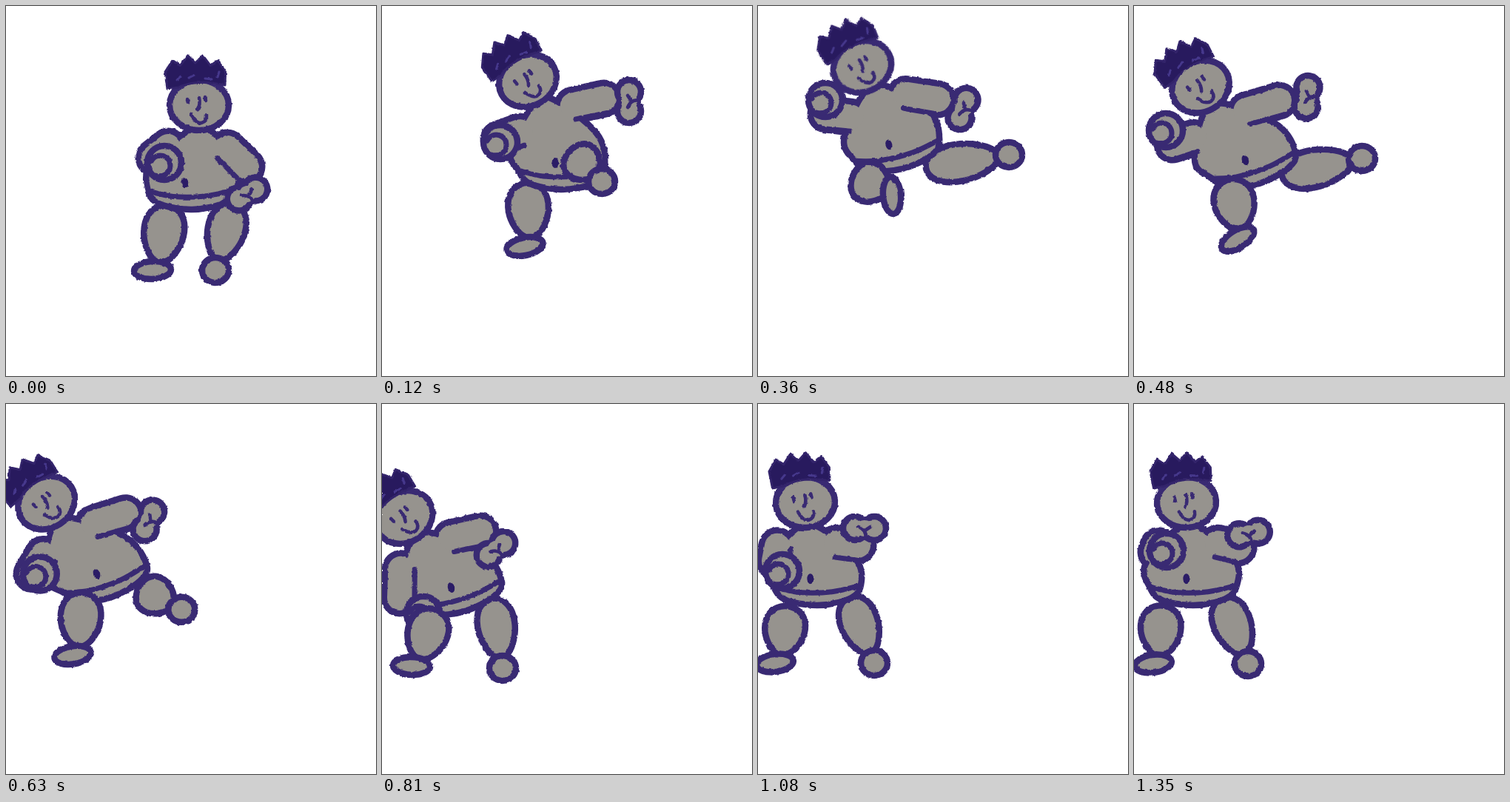
Recreate the animation shown at these times as an HTML page. Size 500 by 500 pixels, loop 8.11 s.

```html
<!DOCTYPE html>
<html lang="en">
<head>
<meta charset="utf-8">
<title>Leap</title>
<style>
  html, body { margin: 0; width: 100%; height: 100%; overflow: hidden; background: #fff; }
  svg { display: block; width: 100vw; height: 100vh; }
  #figure { fill: #96938e; stroke: #392a73; stroke-width: 8.5; stroke-linecap: round; stroke-linejoin: round; }
  .line { fill: none; stroke-width: 7; }
  .thin { fill: none; stroke-width: 4.6; }
  .fill { stroke: none; }
  .rim { stroke-width: 51; }
  .core { stroke: #96938e; stroke-width: 34; }
  .hair { fill: #281a5e; stroke: #33246b; stroke-width: 3; }
  .smudge { fill: none; stroke: #46388c; stroke-width: 3; }
  .ink { fill: #2b1c66; stroke: none; }
</style>
</head>
<body>
<svg viewBox="0 0 500 500">
  <defs>
    <filter id="rough" filterUnits="userSpaceOnUse" x="0" y="0" width="500" height="500" color-interpolation-filters="sRGB">
      <feTurbulence type="fractalNoise" baseFrequency="0.2" numOctaves="2" seed="4"/>
      <feDisplacementMap in="SourceGraphic" scale="3" xChannelSelector="R" yChannelSelector="G"/>
    </filter>
  </defs>
  <g filter="url(#rough)"><g id="figure"></g></g>
</svg>
<script>
const LOOP = 8110, STEP = 30, END = 1350;

// Joints of each key pose: x y, some with an angle. The outline is derived from them.
const stand = {
  root: '0 0', head: '261 134 0', hip: '251 249 -1',
  elbowL: '200 205', fist: '214 212', elbowR: '325 217', hand: '326 254 60',
  thighL: '213 308', footL: '198 357 -3', thighR: '297 305', footR: '283 357'
};
const kick = {
  root: '0 0', head: '197 101 -28', hip: '243 222 0',
  elbowL: '158 180', fist: '160 184', elbowR: '300 125', hand: '334 129 0',
  thighL: '198 276', footL: '193 325 -12', thighR: '271 212', footR: '297 237'
};
const fly = {
  root: '0 0', head: '141 82 -24', hip: '188 195 -14',
  elbowL: '92 146', fist: '91 127', elbowR: '243 126', hand: '277 139 20',
  thighL: '152 239', footL: '181 256 -95', thighR: '276 211', footR: '339 201'
};
const reach = {
  root: '0 0', head: '90 109 -29', hip: '162 215 -18',
  elbowL: '52 187', fist: '43 168', elbowR: '196 128', hand: '234 123 6',
  thighL: '136 268', footL: '140 315 -32', thighR: '247 219', footR: '308 206'
};
const land = {
  root: '0 0', head: '30 153 -33', hip: '105 255 -17',
  elbowL: '24 262', fist: '56 283', elbowR: '133 172', hand: '154 196 52',
  thighL: '61 311', footL: '40 354 2', thighR: '155 303', footR: '163 357'
};
const rise = {
  root: '0 0', head: '64 133 -4', hip: '80 246 -1',
  elbowL: '22 212', fist: '33 226', elbowR: '135 191', hand: '144 168 90',
  thighL: '36 306', footL: '23 350 -8', thighR: '138 299', footR: '157 350'
};
const guard = {
  ...rise, head: '71 133 -4',
  elbowL: '30 200', fist: '44 198', elbowR: '141 194', hand: '155 175 80',
  footL: '26 351 -8', thighR: '134 300', footR: '154 351'
};

const parse = pose => Object.fromEntries(
  Object.entries(pose).map(([k, v]) => [k, v.split(' ').map(Number)]));
const keys = [
  [0, stand], [120, kick], [270, { ...fly, root: '18 -13' }], [360, fly],
  [480, reach], [810, land], [1080, rise], [END, guard]
].map(([t, pose]) => ({ t, p: parse(pose) }));

// Hermite curve through the key poses, coming to rest at the last one.
function poseAt(t) {
  let i = 0;
  while (i < keys.length - 2 && t >= keys[i + 1].t) i++;
  const a = keys[i], b = keys[i + 1], dt = b.t - a.t, u = (t - a.t) / dt;
  const before = keys[i - 1] || a, after = keys[i + 2];
  const h = u * u * (3 - 2 * u), h0 = u * (1 - u) ** 2 * dt, h1 = u * u * (u - 1) * dt;
  const out = {};
  for (const k in a.p) {
    out[k] = a.p[k].map((v, n) => {
      const w = b.p[k][n];
      const m0 = (w - before.p[k][n]) / (b.t - before.t);
      const m1 = after ? (after.p[k][n] - v) / (after.t - a.t) : 0;
      return v + (w - v) * h + m0 * h0 + m1 * h1;
    });
  }
  return out;
}

// Smooth path through points.
function curve(pts, closed) {
  const n = pts.length;
  const at = i => pts[closed ? (i + n) % n : Math.min(n - 1, Math.max(0, i))];
  let d = 'M' + pts[0];
  for (let i = 0; i < (closed ? n : n - 1); i++) {
    const [p, q, r, s] = [at(i - 1), at(i), at(i + 1), at(i + 2)];
    const c1 = q.map((v, k) => v + (r[k] - p[k]) / 6);
    const c2 = r.map((v, k) => v - (s[k] - q[k]) / 6);
    d += `C${c1} ${c2} ${r}`;
  }
  return d + (closed ? 'Z' : '');
}

const path = (d, cls = '') => `<path class="${cls}" d="${d}"/>`;
const oval = (x, y, rx, ry, cls = '') => `<ellipse class="${cls}" cx="${x}" cy="${y}" rx="${rx}" ry="${ry}"/>`;
const place = ([x, y, angle = 0], body) => `<g transform="translate(${x} ${y}) rotate(${angle})">${body}</g>`;

// Maps points of a rotated part to the stage.
function frame([x, y, angle]) {
  const c = Math.cos(angle * Math.PI / 180), s = Math.sin(angle * Math.PI / 180);
  return (px, py) => [x + px * c - py * s, y + px * s + py * c];
}

// Unit vector at right angles to a line; side picks which one.
function normal(a, b, side) {
  const dx = b[0] - a[0], dy = b[1] - a[1], len = Math.hypot(dx, dy) || 1;
  return [-dy / len * side, dx / len * side];
}
const along = (p, n, dist) => [p[0] + n[0] * dist, p[1] + n[1] * dist];
const middle = (a, b) => [(a[0] + b[0]) / 2, (a[1] + b[1]) / 2];

function thigh(center, ankle, width) {
  const dx = ankle[0] - center[0], dy = ankle[1] - center[1];
  const len = Math.max(Math.hypot(dx, dy), width * 0.95);
  const pts = Array.from({ length: 10 }, (_, i) => {
    const a = i * Math.PI / 5, s = Math.sin(a);
    return [width * Math.cos(a) * (1 - 0.16 * s), len * s];
  });
  return place([...center, Math.atan2(-dx, dy) * 180 / Math.PI], path(curve(pts, true)));
}

function leftLeg(p) {
  return thigh(p.thighL, frame(p.footL)(10, -10), 27) + place(p.footL, oval(0, 0, 25, 12));
}

function rightLeg(p) {
  const [cx, cy] = p.thighR, [fx, fy] = p.footR;
  const k = 1 - 14 / Math.hypot(fx - cx, fy - cy);
  return thigh(p.thighR, [cx + (fx - cx) * k, cy + (fy - cy) * k], 25) + place(p.footR, oval(0, 0, 18, 17));
}

function crease(shoulder, elbow, side) {
  const n = normal(shoulder, elbow, side);
  return path(`M${along(shoulder, n, 19)}L${along(elbow, n, 20)}`, 'line');
}

function body(p) {
  const chest = frame(p.head), hip = frame(p.hip);
  const shL = chest(-42, 56), shR = chest(38, 58), hipL = hip(-59, 0), hipR = hip(59, 0);
  const sideL = along(middle(shL, hipL), normal(shL, hipL, 1), 12);
  const sideR = along(middle(shR, hipR), normal(shR, hipR, -1), 12);
  const torso = [chest(-17, 36), chest(15, 34), sideR, hipR,
    hip(43, 18), hip(0, 26), hip(-43, 18), hipL, sideL];
  const arms = `M${shL}L${p.elbowL}M${shR}L${p.elbowR}`;
  return path(arms, 'rim') + path(curve(torso, true)) + path(arms, 'core') +
    path(curve([hipL, hip(-25, 8), hip(20, 8), hipR]), 'line') +
    place([...hip(-9, -10), p.hip[2]], oval(0, 0, 4.5, 7, 'ink')) +
    crease(shL, p.elbowL, -1) + crease(shR, p.elbowR, 1);
}

const hand =
  [-13, 13].map(y => oval(0, y, 16, 16)).join('') +
  [-12, 0, 12].map(y => oval(0, y, 11, 12, 'fill')).join('') +
  path('M14-1Q3-4-2 8M2-2L-2-8', 'thin');
const fist = oval(0, 0, 23, 23) + path('M-18-2C-10-16 8-10 8 4C8 14-2 20-12 17', 'line');

// Four spikes over a flat fringe.
function hairPath() {
  let d = 'M-43-22';
  for (let i = 0; i <= 8; i++) {
    const x = -46 + 10.2 * i, arch = 12 * Math.sin(Math.PI * i / 8);
    d += `L${x} ${-(i % 2 ? 56 : 45) - arch}`;
  }
  return d + 'L35-27Q-4-36-28-24Z';
}
const face = oval(0, 0, 40, 34) + path(hairPath(), 'hair') +
  path('M-30-34l5-5M-14-37l8-4M8-36l9 1M25-38l2-7', 'smudge') +
  path('M-16-8l1 5M8-11l1 5M0-10Q2-1-2 6M-11 12Q-5 25 3 24Q11 22 10 13', 'thin');

const figure = document.getElementById('figure');

function draw(ms) {
  const t = Math.min(END, Math.floor(ms % LOOP / STEP) * STEP);
  const p = poseAt(t);
  const left = leftLeg(p), right = rightLeg(p);
  const leftFront = t >= 210 && t < 930;
  const rightFront = t >= 60 && t < 210;
  figure.setAttribute('transform', `translate(${p.root})`);
  figure.innerHTML =
    (rightFront ? '' : right) + (leftFront ? '' : left) +
    body(p) + place(p.hand, hand) + place(p.fist, fist) +
    (rightFront ? right : '') + (leftFront ? left : '') +
    place(p.head, face);
}

let start;
function tick(now) {
  start ??= now;
  draw(now - start);
  requestAnimationFrame(tick);
}
draw(0);
requestAnimationFrame(tick);
</script>
</body>
</html>
```
